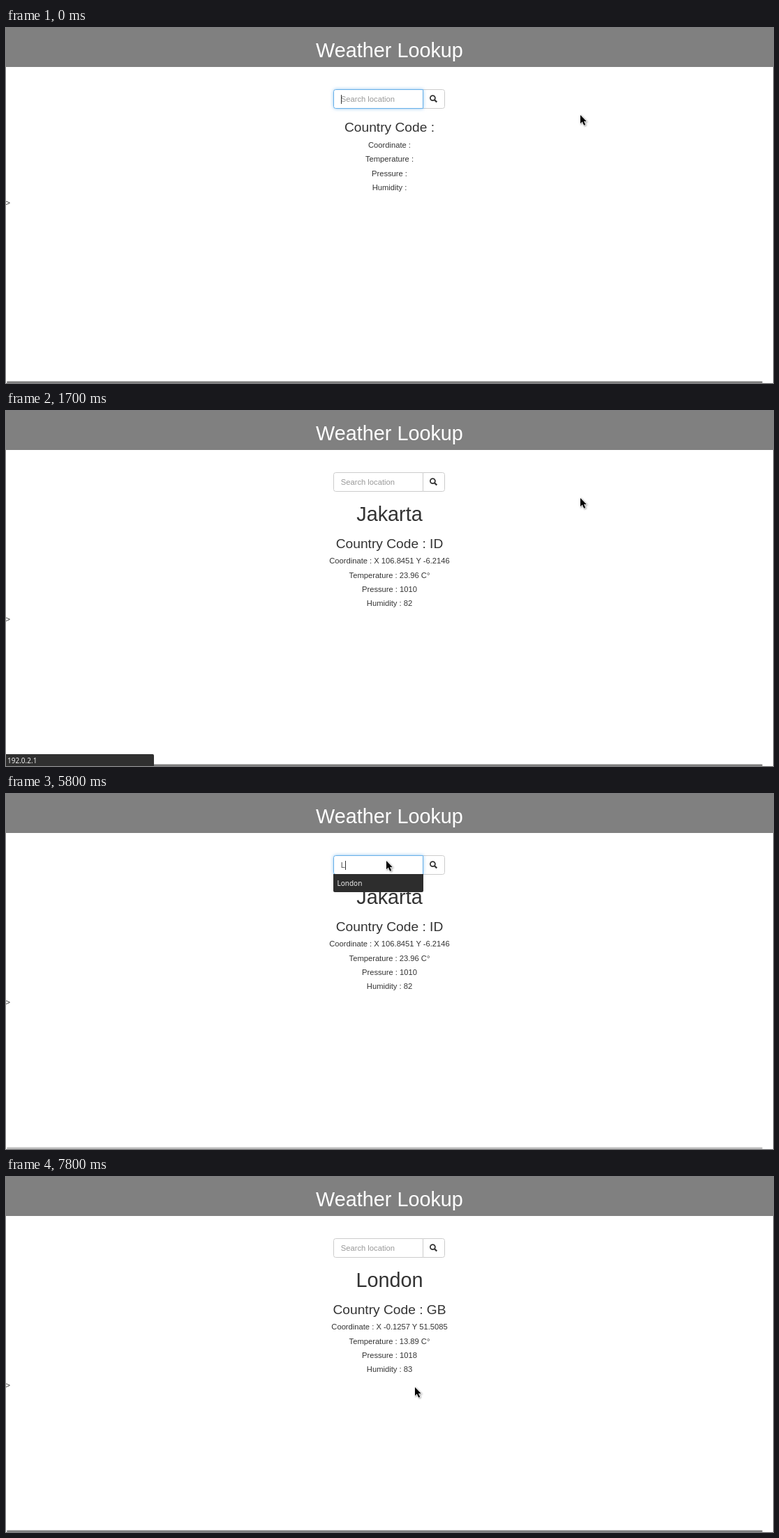
An HTML page that plays this animation: 1099x510 px, repeating every 8000 ms.

```html
<!DOCTYPE html>
<html lang="en">
<head>
<meta charset="utf-8">
<title>Weather Lookup</title>
<style>
html, body { margin: 0; width: 100%; height: 100%; overflow: hidden; background: #fff; }
svg { display: block; width: 1099px; height: 510px; font: 11.2px "Liberation Sans", Arial, sans-serif; fill: #333; }
.mid { text-anchor: middle; }
.h1 { font-size: 28.8px; }
.h3 { font-size: 19.2px; }
.ui { font: 10px "Noto Sans", sans-serif; fill: #eee; }
.box { fill: #fff; stroke: #ccc; }
.focus { stroke: #66afe9; filter: drop-shadow(0 0 2.6px rgba(102, 175, 233, .7)); }
#arrow { filter: drop-shadow(1px 1px 1px rgba(0, 0, 0, .4)); }
</style>
</head>
<body>
<svg viewBox="0 0 1099 510">
  <rect width="1099" height="56" fill="#808080"/>
  <text class="mid h1" x="549.5" y="42" fill="#fff">Weather Lookup</text>

  <path class="box" d="M597.5 88.5H625.5a3 3 0 0 1 3 3V112.5a3 3 0 0 1-3 3H597.5z"/>
  <g fill="none" stroke="#333">
    <circle cx="611.4" cy="100.6" r="3.5" stroke-width="1.8"/>
    <path d="M614 103.2L617.3 106.5" stroke-width="2.3"/>
  </g>
  <path id="field" class="box" d="M597.5 88.5H472.5a3 3 0 0 0-3 3V112.5a3 3 0 0 0 3 3H597.5z"/>
  <text id="entry" x="479.8" y="106"></text>
  <rect id="caret" y="96" width="1" height="13"/>

  <text id="city" class="mid h1" x="549.5" y="158"></text>
  <text id="country" class="mid h3" x="549.5"></text>
  <g id="details" class="mid"></g>
  <text id="stray" x="-.5">&gt;</text>

  <rect id="bar" x="1" y="507.5" width="1083" height="2.5" rx="1.2" fill="#7f7f7f"/>
  <g id="popup" class="ui">
    <path d="M469 115H598V139a2 2 0 0 1-2 2H471a2 2 0 0 1-2-2z" fill="#2d2d2d"/>
    <text x="474.5" y="132">London</text>
  </g>
  <g id="status" class="ui">
    <path d="M0 493H210a2 2 0 0 1 2 2V510H0z" fill="#303030"/>
    <text x="2" y="506">192.0.2.1</text>
  </g>

  <path id="arrow" d="M0 0V12.2L2.8 9.6L5.1 14.8L7.2 13.9L5 8.9H8.7z"
        fill="#000" stroke="#fff" stroke-width="1.2" paint-order="stroke"/>
  <g id="beam" fill="none">
    <path id="stem" d="M-2.5-6.5H-1Q0-6.5 0-5.5Q0-6.5 1-6.5H2.5M0-5.5V5.5M-2.5 6.5H-1Q0 6.5 0 5.5Q0 6.5 1 6.5H2.5"
          stroke="#fff" stroke-width="2.2" stroke-opacity=".7"/>
    <use href="#stem" style="stroke:#000"/>
    <path d="M-2.5-6.5H-1Q0-6.5 0-5.5Q0-6.5 1-6.5H2.5M0-5.5V5.5M-2.5 6.5H-1Q0 6.5 0 5.5Q0 6.5 1 6.5H2.5" stroke="#111"/>
  </g>
</svg>
<script>
const LOOP = 8000;
const $ = id => document.getElementById(id);
const show = (id, on) => $(id).setAttribute('visibility', on ? 'visible' : 'hidden');
const within = (t, from, to) => t >= from && t < to;

// Latest entry of a [time, ...values] list that has begun.
const current = (list, t) => list.filter(([start]) => start <= t).pop();

const labels = ['Coordinate', 'Temperature', 'Pressure', 'Humidity'];
const reports = [
  [0, '', '', '', '', '', ''],
  [1700, 'Jakarta', ' ID', ' X 106.8451 Y -6.2146', ' 23.96 C°', ' 1010', ' 82'],
  [7000, 'London', ' GB', ' X -0.1257 Y 51.5085', ' 13.89 C°', ' 1018', ' 83'],
];
const typed = [
  [0, ''], [600, 'Ja'], [800, 'Jak'], [1000, 'Jaka'], [1100, 'Jakar'], [1300, 'Jakart'], [1500, 'Jakarta'],
  [1700, ''], [5800, 'L'], [6100, 'Lon'], [6300, 'Londo'], [6500, 'London'], [7000, ''],
];
const pointer = [
  [0, 'arrow', 823, 125],
  ...[1, 2, 3, 4].map(i => [2400 + i * 100, 'arrow', 823 - 12.5 * i, 125 + 17.5 * i]),
  [3200, 'arrow', 568, 243], [3600, 'arrow', 590, 267], [3800, 'arrow', 613, 280],
  [4000, 'arrow', 640, 213], [4200, 'arrow', 550, 87],
  [4400, 'beam', 545.5, 96], [4500, 'beam', 545.5, 97],
  [5800, 'arrow', 545, 96], [6700, 'beam', 545.5, 96], [7400, 'beam', 545.5, 97],
  [7600, 'arrow', 585, 301], [7800, 'arrow', 586, 302],
];

$('details').innerHTML = labels.map(() => '<text x="549.5"/>').join('');
const rows = [...$('details').children];

function drawReport(t) {
  const [, city, code, ...values] = current(reports, t);
  $('city').textContent = city;
  $('country').textContent = 'Country Code :' + code;
  $('country').setAttribute('y', city ? 197 : 149);
  $('stray').setAttribute('y', city ? 303 : 255);
  rows.forEach((row, i) => {
    row.textContent = labels[i] + ' :' + values[i];
    row.setAttribute('y', Math.round((city ? 219.4 : 171.9) + 20.35 * i));
  });
}

function drawField(t) {
  const text = current(typed, t)[1];
  const focused = t < 1700 || within(t, 4800, 7000);
  const entry = $('entry');
  entry.textContent = text || 'Search location';
  entry.setAttribute('fill', text ? '#555' : '#999');
  $('field').classList.toggle('focus', focused);
  const width = text ? entry.getComputedTextLength() : 0;
  $('caret').setAttribute('x', Math.floor(480.6 + width));
  show('caret', focused);
}

function drawPointer(t) {
  const [, kind, x, y] = current(pointer, t);
  for (const id of ['arrow', 'beam']) show(id, id === kind);
  $(kind).setAttribute('transform', `translate(${x} ${y})`);
}

function render(t) {
  drawReport(t);
  drawField(t);
  drawPointer(t);
  show('popup', within(t, 5800, 6700));
  show('status', within(t, 1600, 1800) || within(t, 6700, 7000));
  show('bar', !within(t, 600, 1700) && !within(t, 6100, 7000));
  $('bar').setAttribute('opacity', within(t, 5800, 6100) ? .5 : 1);
}

const start = performance.now();
function tick() {
  render((performance.now() - start) % LOOP);
  requestAnimationFrame(tick);
}
tick();
</script>
</body>
</html>
```
